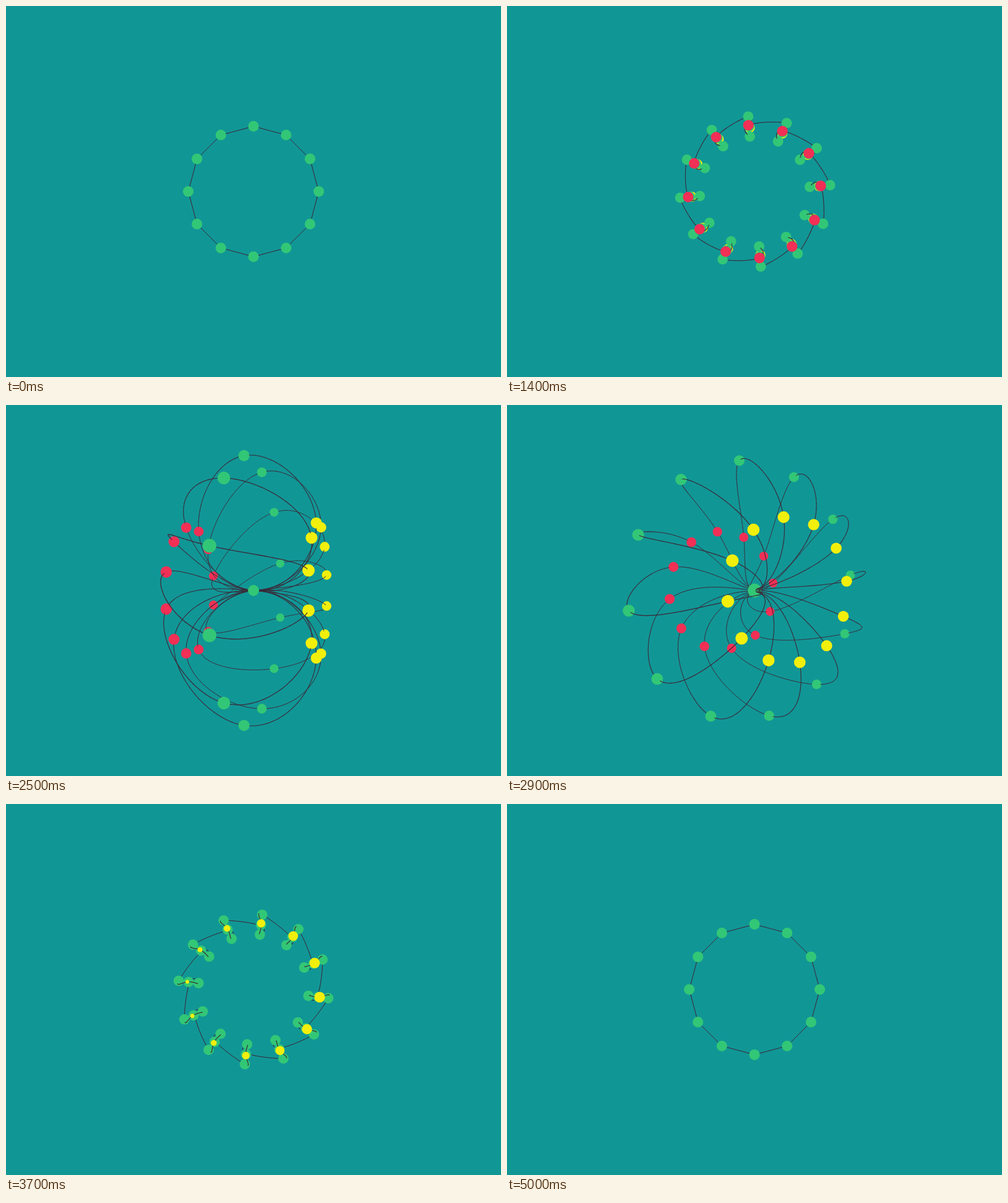
Animation, 800 px wide and 600 px high, one loop 5100 ms. Source, as an HTML page with a canvas:

```html
<!DOCTYPE html>
<html lang="en">
<head>
<meta charset="utf-8">
<title>Coil of dots</title>
<style>
  html, body { margin: 0; width: 100%; height: 100%; overflow: hidden; background: #119696; }
  canvas { display: block; width: 800px; height: 600px; }
</style>
</head>
<body>
<canvas id="stage" width="800" height="600"></canvas>
<script>
const ctx = document.getElementById('stage').getContext('2d');
const BACK = '#119696', LINE = '#3a2b39';
const GREEN = '#32c776', RED = '#f22f55', YELLOW = '#f2ef0c';
const LOOP = 5100, STEP = 100;
const COUNT = 12, RING = 105.5, DOT = 8.4, FOCUS = 800, SAMPLES = 18;

const clamp = v => Math.max(0, Math.min(1, v));
const ramp = (t, from, to) => clamp((t - from) / (to - from));
const ease = (t, from, to) => (1 - Math.cos(Math.PI * ramp(t, from, to))) / 2;
const rad = deg => deg * Math.PI / 180;

const tubeAt = t => RING * (ease(t, 1100, 2270) - ease(t, 2770, 4020));
const yawAt = t => Math.PI * ease(t, 1203, 3543);
const spinAt = t => rad(45 - Math.abs(t - 2500) * 0.018);

// Tangents of the closed cubic spline with continuous curvature
function tangents(pts) {
  const n = pts.length, m = pts.map(() => [0, 0, 0]);
  for (let pass = 0; pass < 12; pass++) {
    for (let i = 0; i < n; i++) {
      const prev = (i + n - 1) % n, next = (i + 1) % n;
      for (let c = 0; c < 3; c++) {
        m[i][c] = (3 * (pts[next][c] - pts[prev][c]) - m[prev][c] - m[next][c]) / 4;
      }
    }
  }
  return m;
}

function hermite(a, b, ma, mb, u) {
  return a.map((p, i) => {
    const d = b[i] - p;
    return p + u * (ma[i] + u * (3 * d - 2 * ma[i] - mb[i] + u * (ma[i] + mb[i] - 2 * d)));
  });
}

function project(p) {
  const s = FOCUS / (FOCUS + p[2]);
  return { x: 400 + p[0] * s, y: 300 + p[1] * s, z: p[2], s };
}

// How much of a coloured dot shows while the tube opens or closes
function coreSize(color, t, tube, x) {
  if (t < 2500) return clamp(tube / 14);
  if (color === RED) return t < 3700 ? 1 : 0;
  const lean = 0.875 * ramp(t, 3500, 3700) * (0.5 - (x - 400) / 215);
  return Math.sqrt(clamp(1 - lean - Math.max(0, (t - 3700) / 150)));
}

function draw(t) {
  const tube = tubeAt(t), yaw = yawAt(t), spin = spinAt(t);
  const cos = Math.cos(yaw), sin = Math.sin(yaw);
  const items = [], path = [];

  function place(angle, radius, z) {
    const x = radius * Math.sin(angle), y = -radius * Math.cos(angle);
    return [x * cos + z * sin, y, z * cos - x * sin];
  }
  function addDot(p, color) {
    const q = project(p);
    let r = DOT * q.s;
    if (color !== GREEN) r *= coreSize(color, t, tube, q.x);
    if (r > 0.2) items.push({ z: q.z - 0.7 * DOT, q, r, color });
  }

  for (let k = 0; k < COUNT; k++) {
    const angle = spin + k * 2 * Math.PI / COUNT;
    const outer = place(angle, RING + tube, 0);
    const yellow = place(angle, RING, tube);
    const inner = place(angle, RING - tube, 0);
    const red = place(angle, RING, -tube);
    path.push(outer, yellow, inner, red);
    addDot(red, RED);
    addDot(yellow, YELLOW);
    addDot(outer, GREEN);
    addDot(inner, GREEN);
    if (tube > 0 && tube < 18) addDot(place(angle, RING, 0), GREEN);
  }

  const m = tangents(path);
  path.forEach((a, i) => {
    const j = (i + 1) % path.length;
    let from = project(a);
    for (let k = 1; k <= SAMPLES; k++) {
      const to = project(hermite(a, path[j], m[i], m[j], k / SAMPLES));
      items.push({ z: (from.z + to.z) / 2, from, to });
      from = to;
    }
  });

  items.sort((a, b) => b.z - a.z);
  ctx.fillStyle = BACK;
  ctx.fillRect(0, 0, 800, 600);
  ctx.strokeStyle = LINE;
  ctx.lineCap = 'round';
  for (const it of items) {
    ctx.beginPath();
    if (it.q) {
      ctx.fillStyle = it.color;
      ctx.arc(it.q.x, it.q.y, it.r, 0, 2 * Math.PI);
      ctx.fill();
    } else {
      ctx.lineWidth = it.to.s;
      ctx.moveTo(it.from.x, it.from.y);
      ctx.lineTo(it.to.x, it.to.y);
      ctx.stroke();
    }
  }
}

const start = performance.now();
function tick() {
  const t = (performance.now() - start) % LOOP;
  draw(Math.floor(t / STEP) * STEP);
  requestAnimationFrame(tick);
}
tick();
</script>
</body>
</html>
```
